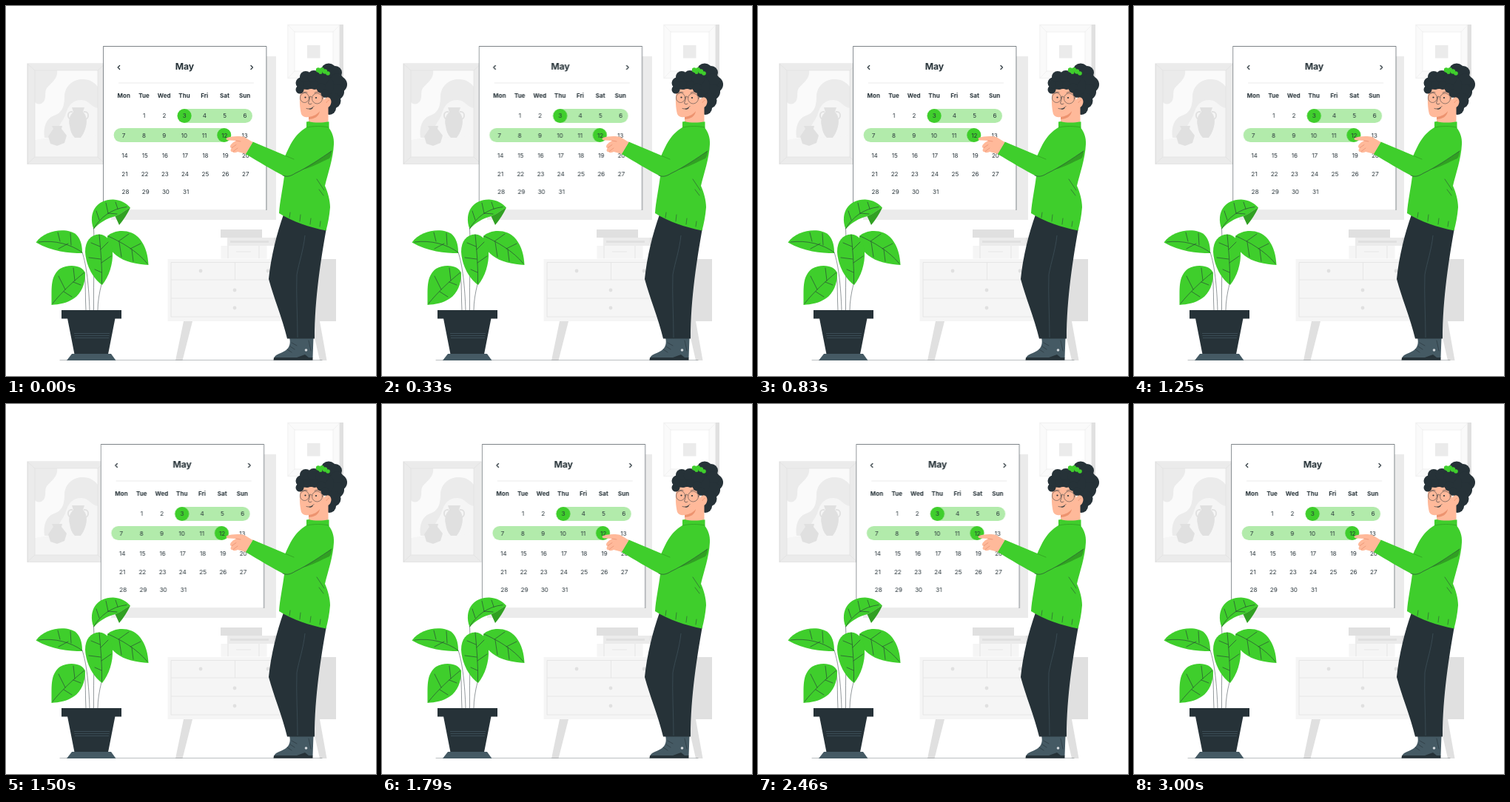
These frames come from a looping animation (500 px wide and 500 px high, 3040 ms). An HTML page:

```html
<!DOCTYPE html>
<html lang="en">
<head>
<meta charset="utf-8">
<title>Calendar</title>
<style>
  html, body { margin: 0; width: 100%; height: 100%; overflow: hidden; background: #fff; }
  svg { display: block; width: 100%; height: 100%; }
  text { font-family: Inter, "Open Sans", sans-serif; font-size: 8px; font-weight: 400; fill: #263238; text-anchor: middle; }
  .bold { font-weight: 700; }
  .title { font-size: 12.2px; font-weight: 700; }
  .green { fill: #3fce2c; }
  .shade { fill: #31a023; }
  .pale { fill: #b2ebab; }
  .dark { fill: #263238; }
  .slate { fill: #455a64; }
  .skin { fill: #ffb99a; }
  .g1 { fill: #e0e0e0; }
  .g2 { fill: #ebebeb; }
  .g3 { fill: #f5f5f5; }
  .g4 { fill: #fafafa; }
  .white { fill: #fff; }
  .line { fill: none; stroke: #263238; stroke-width: .6; stroke-linecap: round; stroke-linejoin: round; }
  .soft { fill: none; stroke: #e0e0e0; stroke-width: .7; }
  .fold { fill: none; stroke: #31a023; stroke-width: .8; stroke-linecap: round; }
  /* 3 s shake, then a 40 ms rest */
  #card { animation: shake 3040ms linear -20ms infinite; }
  @keyframes shake {
    0%, 98.684%, 100% { transform: translateX(0); }
    9.868%, 88.816% { transform: translateX(-1px); }
    19.737%, 78.947% { transform: translateX(2px); }
    29.605%, 49.342%, 69.079% { transform: translateX(-4px); }
    39.474%, 59.211% { transform: translateX(4px); }
  }
</style>
</head>
<body>
<svg viewBox="0 0 500 500">
  <g id="wall-left">
    <rect class="g1" x="28.5" y="77.5" width="106" height="136.5"/>
    <rect class="g2" x="30" y="78" width="104.5" height="135.5"/>
    <path class="soft" d="M29 78L39 87M29 213.500L39 204M134 78L124 87M134 213.500L124 204" stroke-width=".5"/>
    <rect class="g4" x="39" y="87" width="85" height="117"/>
    <path class="g2" d="M39 87H69C71 97 61 104 55 111C51 117 56 126 49 131C45 134 41 132 39 130Z"/>
    <path class="g2" d="M52 178C50 164 54 152 65 148C77 144 79 134 79 122C80 107 91 99 104 99C114 99 120 104 124 109V178Z"/>
    <path class="g3" d="M68 178C68 164 76 157 80 148C84 134 90 127 102 127C112 127 114 136 124 138V178Z"/>
    <path class="g3" d="M39 181C66 175 96 179 124 175V204H39Z"/>
    <path class="g1" d="M62 162H76L75 166L82 175L79 185L69 189L60 186L57 176L64 166Z"/>
    <path class="g1" d="M89 137H106L104 143C109 148 110 155 108 163C106 171 103 175 101 178H93C89 174 87 169 86 162C84 154 86 148 91 143Z"/>
    <path d="M90 143C82 142 83 151 87 153M105 143C113 142 112 151 108 153" fill="none" stroke="#e0e0e0" stroke-width="1.8"/>
    <rect class="soft" x="39" y="87" width="85" height="117"/>
  </g>

  <g id="wall-right">
    <rect class="g1" x="450" y="25" width="6" height="73"/>
    <rect class="g2" x="380.5" y="25" width="70.5" height="73"/>
    <rect class="g4" x="381.2" y="25.700" width="69" height="71.600"/>
    <path d="M381 25.500L390 35M451 25.500L442 35M381 97.500L390 88M451 97.500L442 88" stroke="#ebebeb" stroke-width=".6"/>
    <rect x="390" y="35" width="52" height="53" fill="#fff" stroke="#ebebeb" stroke-width=".7"/>
    <rect class="g2" x="407" y="53" width="17.5" height="17.5"/>
  </g>

  <g id="cabinet">
    <path class="g1" d="M240 426H252L238.500 479H229ZM412 426H424L433.500 479H424Z"/>
    <rect class="g1" x="395" y="342" width="51" height="84"/>
    <rect class="g3" x="218.500" y="342" width="181" height="84"/>
    <path class="soft" d="M223 346.500H395.500V420H223ZM223 370H395.500M223 395H395.500M309.500 346.500V370"/>
    <g class="g1">
      <circle cx="263" cy="358" r="2.400"/><circle cx="354" cy="358" r="2.400"/>
      <circle cx="309" cy="384" r="2.400"/><circle cx="309" cy="408" r="2.400"/>
    </g>
    <rect class="g1" x="290" y="302" width="56" height="11"/>
    <rect class="g2" x="299" y="313" width="69" height="11"/>
    <rect class="g1" x="303" y="317" width="52" height="3"/>
    <path class="g1" d="M362 313H370V324H362Z"/>
    <rect class="g3" x="290.500" y="324" width="62" height="17.500"/>
    <path class="soft" d="M300 324V341M342 324V341M311 332H331" stroke-width=".6"/>
  </g>

  <rect class="g2" x="142" y="68" width="223" height="221"/>

  <g id="card">
    <rect class="white" x="131.500" y="54.500" width="220.500" height="221"/>
    <path d="M131.500 275.500H352" stroke="#e0e0e0" stroke-width=".4"/>
    <path class="line" d="M131.500 275.500V54.500H352V275.500"/>
    <path d="M152 104H335" stroke="#ebebeb" stroke-width="1"/>
    <path class="line" d="M153.700 80.500L151.200 83L153.700 85.500M331 80.500L333.500 83L331 85.500" style="stroke-width:1.2"/>
    <rect class="pale" x="231.500" y="139" width="101.500" height="19" rx="9.500"/>
    <rect class="pale" x="145.700" y="165" width="158.500" height="19" rx="9.500"/>
    <circle class="green" cx="241.200" cy="148.500" r="9.500"/>
    <circle class="green" cx="294.800" cy="174.500" r="9.500"/>
    <text class="title" x="241.500" y="86.400">May</text>
  </g>

  <path class="line" d="M73 478.600H427" style="stroke-width:.35"/>

  <g id="plant">
    <path class="line" d="M103 333C109 350 112 380 113 411M106 362C108 378 107 395 108 411M118.500 300C120 330 118 370 118.500 411M129 376C126 388 124 400 124 411" style="stroke-width:.5"/>
    <path class="green" d="M118.500 301.500C110 278 124 261 145 261.500C156 262 163 267 168 272.500C161 275 157 281 148 284C136 287 126 293 118.500 301.500Z"/>
    <path class="shade" d="M147.500 284C157 281 161 275 168 272.500C164 281 159 289 153 296Z"/>
    <path class="green" d="M40.500 319.500C53 302 83 299 95 309C102 316 103 326 103 334C85 334 62 332 40.500 319.500Z"/>
    <path class="green" d="M137 311C146 302 169 300 181 315C189 325 192 338 192.500 350C177 349 160 346 149 337C140 330 136 321 137 311Z"/>
    <path class="green" d="M126 308.500C114 309 107 318 107 332C108 351 118 369 130 377C139 366 145 348 144 332C143 318 136 309 126 308.500Z"/>
    <path class="green" d="M61.500 404C62 382 59 366 73 355C85 348 104 350 107 361C107 376 102 388 92 395C82 402 72 403 61.500 404Z"/>
    <path class="line" d="M118.500 301C127 286 142 274 163 271.500M126 289L122 277M138 280L135 266M138 280L150 281M151 274L148 265
      M103 333C88 322 66 316 44 319M88 323L87 307M73 318L70 306M84 321L71 328
      M138 311C156 319 177 331 191 348M152 318L166 308M168 328L182 321M153 319L156 339M170 329L172 345
      M126 309C128 330 130 352 129.500 375M127 325L115 320M128 342L112 340M128 329L138 319M129 347L142 338M129 360L120 356
      M106 360C91 372 75 387 63 402M93 371L91 354M80 383L71 365M91 373L101 377M78 386L89 393"/>
    <path class="dark" d="M75 411H156V422.500H75ZM83 422H147.500L138 470.500H92.500Z"/>
    <path d="M92 442.500H140M92.500 445.500H139.500M93 448.500H139" stroke="#455a64" stroke-width=".7"/>
    <path class="slate" d="M89 470H142L148.500 479H82Z"/>
  </g>

  <g id="woman">
    <path class="slate" d="M383 448H415.500L414.500 475.500H362.500C363 471 371 470 377 466C383 462 385 456 383 448Z"/>
    <path class="dark" d="M362 475H393L404 471L409 475H414.500V478.700H361.500Z"/>
    <path class="line" d="M380 464L386 468M384 460L390 464M386 455L393 459M409 452L412 466"/>
    <circle cx="405.500" cy="465" r="1.800" fill="#d5dade"/>
    <path class="dark" d="M375 282L433 300C426 340 417 395 417 449.500H380C373 421 362 395 355 369C358 339 366 307 375 282Z"/>
    <path d="M404 310C402 330 396 346 393 363C392 390 394 420 394 448" fill="none" stroke="#455a64" stroke-width=".6"/>

    <path class="green" d="M406 156.500C416 154.500 427 155 436.500 156.500V165C441 171 443.500 178 443 187C442 207 435 226 431 243C435 252 438 263 438 272C437 284 435 294 432.500 303.500C410 299 388 292 369 280C370 264 374 247 376 230C362 223 341 210 323.500 200L333.500 183.500L377.500 202C383 190 389 174 406 164Z"/>
    <path class="shade" d="M401 221C416 213 429 204 440 196C440 200 439 204 437 206C425 211 414 218 401 221Z"/>
    <path class="line" d="M440 196C425 206 408 218 391 226C383 231 379 231 374 229"/>
    <path class="fold" d="M407 164C416 162 427 162 436 164M378 202.500L389 207"/>
    <path class="line" d="M420 234L430 249M423 248L429 256" style="stroke-width:.5"/>
    <path class="line" d="M383 286L384 279M397 291L398 282M411 295L412 287M424 298L425 291" style="stroke-width:.5"/>

    <path class="skin" d="M333.500 184L322 177C315 175 304 176 298.500 178C296.500 180 298 181.500 302 181.500L311 182C307 184 303 187 303 190C303 191.500 304 192 305 191.700C303 194 303 197 306 197C308 199 311 198 313 197C317 198 321 199 324 200Z"/>
    <path d="M311 182L317 183M305 191.700L311 187.500M307 196.500L313 192" fill="none" stroke="#e58c6d" stroke-width=".7" stroke-linecap="round"/>

    <g class="dark">
      <circle cx="436" cy="88" r="10.500"/>
      <circle cx="445" cy="90" r="9"/>
      <circle cx="450" cy="106" r="11"/>
      <circle cx="447" cy="100" r="9"/>
      <circle cx="446" cy="116" r="11"/>
      <circle cx="442" cy="128" r="10.500"/>
      <circle cx="437" cy="138" r="9"/>
      <circle cx="416" cy="107" r="18"/>
      <circle cx="429" cy="108" r="14"/>
    </g>
    <path class="skin" d="M398 113C396 126 397 138 399 146C401 150 405 151 409 150V156C417 158 428 158 435.500 156V137C440 134 441 127 437 124C434 122 431 124 430 127L427 111Z"/>
    <path d="M409 150C416 149 421 146 424 142C423 149 417 153 409 153Z" fill="#ed936f"/>
    <g class="dark">
      <circle cx="397" cy="113" r="5.500"/>
      <circle cx="399" cy="104" r="7.500"/>
      <circle cx="405" cy="96" r="8"/>
      <circle cx="416" cy="95.500" r="8.500"/>
      <circle cx="427" cy="98" r="9"/>
      <circle cx="407" cy="107" r="6"/>
      <circle cx="417" cy="107" r="6"/>
      <circle cx="426" cy="111" r="6.500"/>
      <circle cx="431" cy="118" r="5.500"/>
    </g>
    <path d="M433 131C434 128 436 127 437 128" fill="none" stroke="#ed936f" stroke-width=".8"/>
    <path class="line" d="M401 117.500C403 116 405 116 407 117M417 117.500C420 115.500 423 116 425 117.500M411 123C410 128 408 131 409 132C410 133 412 133 413 132M406 138.500C410 140 414 138 416 135.500"/>
    <path class="dark" d="M409 139C412 139 414 138 415 136.500C415 139 411 141 409 139Z"/>
    <circle class="dark" cx="404.500" cy="123.500" r="1.100"/>
    <circle class="dark" cx="419" cy="124" r="1.100"/>
    <g class="line" style="stroke-width:.5">
      <ellipse cx="403.500" cy="124" rx="6" ry="6.500"/>
      <circle cx="420.500" cy="125" r="7"/>
      <path d="M409.500 123C411 121.500 412.500 122 413.600 123.500M427.500 124L434 123"/>
    </g>
    <g class="green">
      <circle cx="422" cy="86.500" r="3.200"/><circle cx="427" cy="86" r="3"/>
      <circle cx="431" cy="88.500" r="3.200"/><circle cx="435" cy="91" r="2.800"/>
      <circle cx="425" cy="89.500" r="2.500"/>
    </g>
  </g>
</svg>
<script>
  const card = document.getElementById('card');
  const step = 27.25;

  function label(str, x, y, cls) {
    const el = document.createElementNS('http://www.w3.org/2000/svg', 'text');
    el.textContent = str;
    el.setAttribute('x', x);
    el.setAttribute('y', y);
    if (cls) el.setAttribute('class', cls);
    card.append(el);
  }

  'Mon Tue Wed Thu Fri Sat Sun'.split(' ')
    .forEach((name, i) => label(name, 159.300 + i * step, 124.400, 'bold'));

  const rows = [
    { first: 1, count: 6, x: 186.700, y: 151.200 },
    { first: 7, count: 7, x: 159.200, y: 178.200 },
    { first: 14, count: 7, x: 160.500, y: 205 },
    { first: 21, count: 7, x: 160.400, y: 230 },
    { first: 28, count: 4, x: 161.500, y: 254 }
  ];
  for (const { first, count, x, y } of rows)
    for (let i = 0; i < count; i++) label(first + i, x + i * step, y);
</script>
</body>
</html>
```
